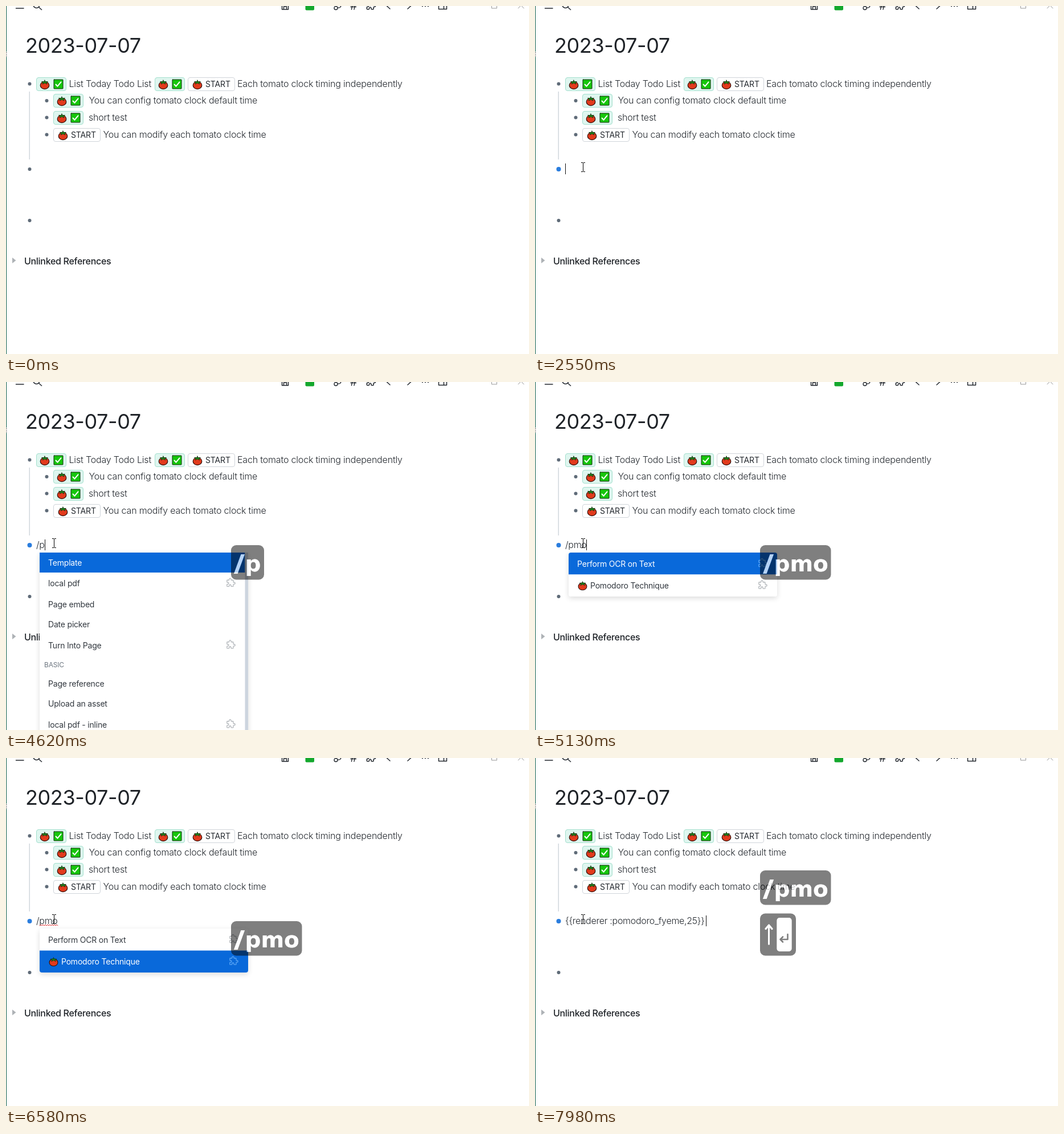
An HTML page with a canvas that plays this animation: 918 px wide and 610 px high, repeating every 8 s.

```html
<!DOCTYPE html>
<html lang="en">
<head>
<meta charset="utf-8">
<title>Daily journal</title>
<style>
  html, body { margin: 0; width: 918px; height: 610px; overflow: hidden; background: #fff; }
  canvas { display: block; }
</style>
</head>
<body>
<canvas id="stage" width="918" height="610"></canvas>
<script>
const LOOP = 8000;
const INK = '#24292f', BLUE = [9, 105, 218];
const stage = document.getElementById('stage').getContext('2d');
const layer = document.createElement('canvas');
layer.width = 918;
layer.height = 610;
const keys = layer.getContext('2d');
let g = stage;

const rgb = c => `rgb(${c.map(Math.round).join(',')})`;
const mix = (a, b, p) => a.map((v, i) => v + (b[i] - v) * p);
const WHITE = [255, 255, 255], DARK = [50, 56, 63];

// Last value whose start time has been reached.
const at = (t, track) => track.reduce((v, [start, value]) => t >= start ? value : v, null);

function text(s, x, y, { size = 16, weight = 350, color = INK, track = -0.18, family = 'Inter, sans-serif' } = {}) {
  g.font = `${weight} ${size}px ${family}`;
  g.letterSpacing = track + 'px';
  g.fillStyle = color;
  g.fillText(s, x, y);
}

function rect(x, y, w, h, color) {
  g.fillStyle = color;
  g.fillRect(x, y, w, h);
}

function box(x, y, w, h, r, fill, stroke) {
  g.beginPath();
  g.roundRect(x, y, w, h, r);
  if (fill) { g.fillStyle = fill; g.fill(); }
  if (stroke) { g.lineWidth = 1; g.strokeStyle = stroke; g.stroke(); }
}

function dot(x, y, r, color) {
  g.beginPath();
  g.arc(x, y, r, 0, Math.PI * 2);
  g.fillStyle = color;
  g.fill();
}

function line(d, color = INK, width = 1.5) {
  g.strokeStyle = color;
  g.lineWidth = width;
  g.lineCap = g.lineJoin = 'round';
  g.stroke(new Path2D(d));
}

const PUZZLE = new Path2D('M4 7h3a1 1 0 0 0 1-1v-1a2 2 0 0 1 4 0v1a1 1 0 0 0 1 1h3a1 1 0 0 1 1 1v3a1 1 0 0 0 1 1h1a2 2 0 0 1 0 4h-1a1 1 0 0 0-1 1v3a1 1 0 0 1-1 1h-3a1 1 0 0 1-1-1v-1a2 2 0 0 0-4 0v1a1 1 0 0 1-1 1h-3a1 1 0 0 1-1-1v-3a1 1 0 0 1 1-1h1a2 2 0 0 0 0-4h-1a1 1 0 0 1-1-1v-3a1 1 0 0 1 1-1z');

function puzzle(x, y, color, scale = 0.8, width = 1.6) {
  g.save();
  g.translate(x, y);
  g.scale(scale, scale);
  g.translate(-12, -12);
  g.strokeStyle = color;
  g.lineWidth = width;
  g.stroke(PUZZLE);
  g.restore();
}

function tomato(x, y, scale = 1) {
  g.save();
  g.translate(x, y);
  g.scale(scale, scale);
  g.beginPath();
  g.ellipse(0, 1, 7.8, 6.6, 0, 0, Math.PI * 2);
  g.fillStyle = '#e23a1c';
  g.fill();
  g.lineWidth = 1.2;
  g.strokeStyle = '#30100c';
  g.stroke();
  g.fillStyle = '#1d8a1c';
  g.strokeStyle = '#12300f';
  g.lineWidth = 0.8;
  const leaf = new Path2D('M0 -8L1 -5.5L5.5 -5.5L3 -3.5L4 -1L0 -3L-4 -1L-3 -3.5L-5.5 -5.5L-1 -5.5Z');
  g.fill(leaf);
  g.stroke(leaf);
  g.restore();
}

function donePill(x, y) {
  box(x + .5, y - 11.5, 52, 23, 3.5, '#dff6ef', '#a3dfce');
  tomato(x + 15, y + 1);
  box(x + 31, y - 8, 16, 16, 0.5, '#16c60c', '#0e2a0d');
  line(`M${x + 34.5} ${y + .5}l3 3.2l6 -7.4`, '#fff', 2);
}

function startPill(x, y) {
  box(x + .5, y - 11.5, 82, 23, 3.5, '#fff', '#d0d5da');
  tomato(x + 17, y + 1);
  text('START', x + 31, y + 5, { size: 14, weight: 400, track: -0.1 });
}

function toolbar() {
  line('M17.5 -3.5H31M17.5 4H31');
  line('M59 -2a5.5 5.5 0 1 1 -11 0a5.5 5.5 0 1 1 11 0M57.5 2L62.5 6.5');
  line('M484.5 -4V6H495.5V-4M487.5 6V1H492.5V6');
  box(525.5, -4, 15.5, 11.5, 2, '#14a82d');
  line('M583 3a4 4 0 1 0 -3 -4M582 3.5a3 3 0 1 1 -6 0a3 3 0 1 1 6 0', INK, 1.4);
  line('M605 1.5H614.5M608.5 -4L606.5 6M613 -4L611 6', INK, 1.4);
  puzzle(641, -2, INK, 0.85, 1.8);
  line('M668 -.5L674 5M711 -.5L705 5');
  for (const x of [731, 736, 741]) dot(x, 0, 1.2, INK);
  line('M759.5 -4V5.5H773.5V-4M768.5 -4V5.5');
  line('M852.5 -4V4H861.5V-4', '#999', 1);
  line('M899 4L904 -1L909 4', '#999', 1);
}

function page() {
  rect(0, 0, 918, 610, '#fff');
  rect(0, 0, 1, 610, '#115f4d');
  rect(0, 80, 1, 9, '#fff');
  for (const y of [81, 84, 87]) rect(0, y, 1.5, 1, '#333');
  toolbar();
  text('2023-07-07', 34, 81.5, { size: 36, weight: 400, color: '#1f2328', track: -0.4 });

  rect(40.5, 150, 1.5, 119, '#d0d7dc');
  for (const [x, y] of [[41.5, 136.5], [71.5, 166], [71.5, 195.5], [71.5, 225.5], [41.5, 376]])
    dot(x, y, 3, '#5f6b78');

  donePill(53, 137);
  text('List Today Todo List', 110.5, 142);
  donePill(261, 137);
  startPill(319, 137);
  text('Each tomato clock timing independently', 406, 142);
  donePill(83, 166);
  text('You can config tomato clock default time', 145.5, 171);
  donePill(83, 196);
  text('short test', 145, 201);
  startPill(83, 226);
  text('You can modify each tomato clock time', 170.5, 231);

  g.fillStyle = '#aeb2b6';
  g.fill(new Path2D('M11 441L17.5 446L11 451Z'));
  text('Unlinked References', 32, 453, { weight: 450, color: '#1f2328', track: -0.3 });
}

// --- edited block ---
const TYPED = [[0, ''], [3550, '/'], [4480, '/p'], [4820, '/pm'], [5060, '/pmo'],
  [6930, '{{renderer :pomodoro_fyeme,25}}']];
const CARET_X = [[0, 53], [3550, 58], [4480, 68], [4820, 81], [5060, 90], [6930, 300]];
const CARET_ON = [[0, false], [1490, true], [2040, false], [2550, true], [3070, false], [3550, true],
  [4080, false], [4480, true], [5540, false], [6020, true], [6580, false], [6930, true],
  [7490, false], [7980, true]];

function editor(t) {
  const focus = Math.min(1, Math.max(0, (t - 1490) / 200));
  dot(41.5, 286, 3 + focus, rgb(mix([95, 107, 120], [42, 125, 222], focus)));
  text(at(t, TYPED), 53, 291, { weight: 300, track: -0.28 });
  if (t >= 6050 && t < 6930) {
    let d = 'M59 294';
    for (let x = 61, up = true; x <= 91; x += 2, up = !up) d += `L${x} ${up ? 292 : 294}`;
    line(d, '#e03030', 1);
  }
  if (at(t, CARET_ON)) rect(at(t, CARET_X), 276, 1, 19, '#111');
}

// --- command menu ---
const ROW = 35, PLUGIN_ROW = 38.5, HEAD_ROW = 30.5;

function menuPanel(height) {
  g.save();
  g.shadowColor = 'rgba(0,0,0,.14)';
  g.shadowBlur = 10;
  g.shadowOffsetY = 3;
  box(59, 299, 366, height, 4, '#fff');
  g.restore();
}

function menuList(rows, thumb) {
  menuPanel(330);
  let y = 299, first = true;
  for (const [label, kind] of rows) {
    const h = kind === 'head' ? HEAD_ROW : kind === 'plugin' ? PLUGIN_ROW : ROW;
    if (kind === 'head') {
      text(label, 67, y + 19, { size: 12, weight: 400, color: '#6e7781', track: -0.2 });
    } else {
      if (first) rect(59, y, 360.5, h, rgb(BLUE));
      text(label, 74, y + h / 2 + 5, { size: 14, weight: 400, color: rgb(first ? WHITE : DARK), track: -0.2 });
      if (kind) puzzle(395, y + h / 2 - 2, '#b3b7bb');
      first = false;
    }
    y += h;
  }
  rect(419.5, 299, 5.5, thumb, '#cdd5df');
}

const basics = ['Page reference', 'Page embed', 'Block reference', 'Block embed', 'Link', 'Image link', 'Underline', 'Code block'];
const ALL_ROWS = [['BASIC', 'head'], ...basics.map(s => [s])];
const P_ROWS = [['Template'], ['local pdf', 'plugin'], ['Page embed'], ['Date picker'], ['Turn Into Page', 'plugin'],
  ['BASIC', 'head'], ['Page reference'], ['Upload an asset'], ['local pdf - inline', 'plugin']];

function matches(t) {
  const p = at(t, [[0, 0], [6380, .37], [6440, .75], [6480, .92], [6520, 1]]);
  menuPanel(2 * PLUGIN_ROW);
  g.save();
  g.beginPath();
  g.roundRect(59, 299, 366, 2 * PLUGIN_ROW, 4);
  g.clip();
  [1 - p, p].forEach((lit, i) => {
    const top = 299 + i * PLUGIN_ROW;
    rect(59, top, 366, PLUGIN_ROW, rgb(mix(WHITE, BLUE, lit)));
    const style = { size: 14, weight: 400, track: -0.2, color: rgb(mix(DARK, WHITE, lit)) };
    if (i) tomato(83.5, 357.5, .95);
    text(i ? 'Pomodoro Technique' : 'Perform OCR on Text', i ? 97 : 74, top + 24.5, style);
    puzzle(400, top + 17.5, rgb(mix([179, 183, 187], [90, 165, 245], lit)));
  });
  g.restore();
}

function menu(t) {
  const state = at(t, [[0, ''], [3610, 'all'], [4550, 'p'], [4890, 'matches'], [6930, '']]);
  if (state === 'all') menuList(ALL_ROWS, 70);
  if (state === 'p') menuList(P_ROWS, 330);
  if (state === 'matches') matches(t);
}

// --- keystroke overlay ---
function withLayer(draw) {
  g = keys;
  g.clearRect(0, 0, 918, 610);
  draw();
  g = stage;
  g.drawImage(layer, 0, 0);
}

// Glyphs replace the cap's shade, so the page tints them slightly.
function punch(draw) {
  g.globalCompositeOperation = 'destination-out';
  draw('#000');
  g.globalCompositeOperation = 'source-over';
  draw('rgba(255,255,255,.7)');
}

const SHADE = 'rgba(0,0,0,.5)';

function slashCap(y, letters, width) {
  box(395, y, width, 60.5, 9, SHADE);
  punch(color => {
    g.fillStyle = color;
    g.fill(new Path2D(`M412.5 ${y + 16}h6.5L406.5 ${y + 50}h-6.5Z`));
    text(letters, 419.5, y + 45.5, { size: 39, weight: 700, color, track: 0, family: '"DejaVu Sans", sans-serif' });
  });
}

function enterCap() {
  box(395, 272.5, 63, 74, 9, SHADE);
  punch(color => {
    line('M410.5 293V326M405 299.5L410.5 293L416 299.5', color, 3);
    box(424.5, 280, 26, 59, 5, color);
  });
  line('M443.5 309V318H430.5M435 313.5L430.5 318L435 322.5', '#808080', 2.6);
}

function keystrokes(t) {
  if (t < 3550) return;
  const [letters, width] = at(t, [[3550, ['', 30.5]], [4480, ['p', 58]], [4820, ['pm', 98]], [5060, ['pmo', 124.5]]]);
  const entered = t >= 6900;
  withLayer(() => {
    slashCap(entered ? 197 : 286, letters, width);
    if (entered) enterCap();
  });
}

// --- mouse ---
function glide(t, t0, t1, a, b) {
  const p = Math.min(1, Math.max(0, (t - t0) / (t1 - t0)));
  return mix(a, b, p * p * (3 - 2 * p)).map(Math.round);
}

function mouse(t) {
  if (t < 350) return;
  const rest = [315, 403];
  const [x, y] = t < 760 ? glide(t, 320, 610, [840, 612], rest) : glide(t, 730, 1120, rest, [84, 282]);
  const overBlock = (y > 271 && y < 301) || (y > 361 && y < 391);
  if (overBlock) {
    rect(x, y - 7, 1, 15, '#000');
    for (const edge of [y - 8, y + 8]) {
      rect(x - 3, edge, 3, 1, '#000');
      rect(x + 1, edge, 3, 1, '#000');
    }
  } else {
    const arrow = new Path2D(`M${x + .5} ${y + .5}v16l3.7 -3.6l2.6 5.8l2.4 -1l-2.6 -5.7h5Z`);
    g.fillStyle = '#fff';
    g.fill(arrow);
    g.lineWidth = 1;
    g.strokeStyle = '#000';
    g.stroke(arrow);
  }
}

const began = performance.now();

function frame(now) {
  const t = Math.max(0, now - began) % LOOP;
  page();
  editor(t);
  menu(t);
  mouse(t);
  keystrokes(t);
  requestAnimationFrame(frame);
}

frame(began);
</script>
</body>
</html>
```
